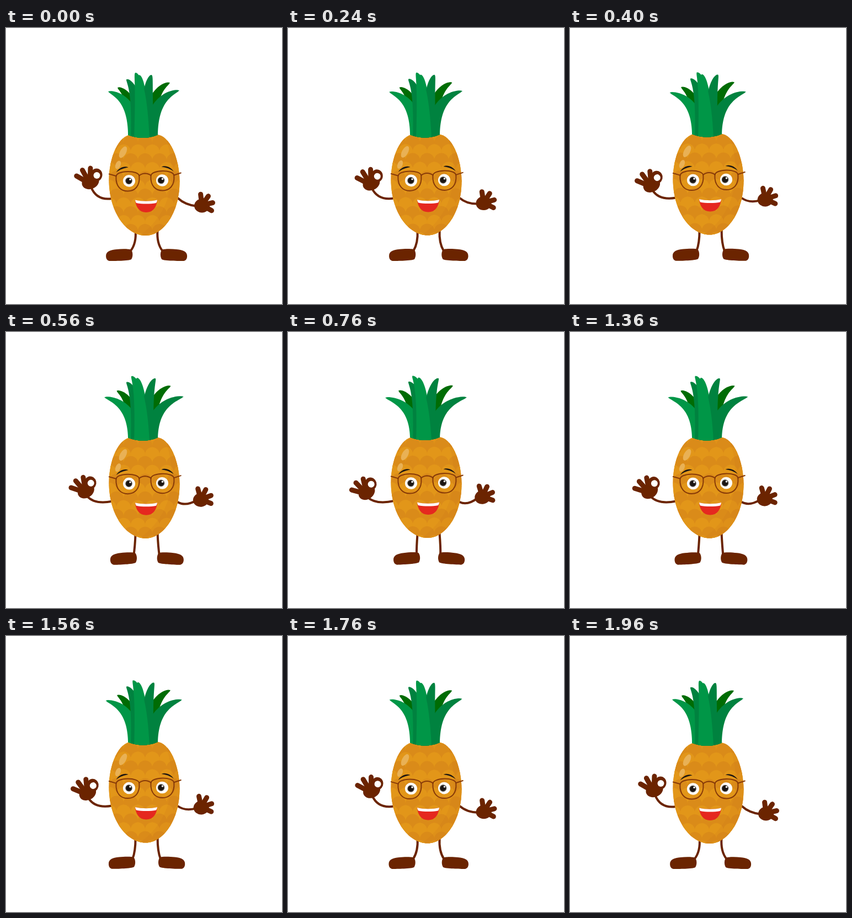
An HTML page with a canvas for the animation above (2000 ms loop, 500 by 500 pixels).

```html
<!DOCTYPE html>
<html lang="en">
<head>
<meta charset="utf-8">
<title>Pineapple</title>
<style>
html, body { margin: 0; width: 100%; height: 100%; overflow: hidden; background: #fff; }
canvas { display: block; }
</style>
</head>
<body>
<canvas id="stage" width="500" height="500"></canvas>
<script>
const ctx = document.getElementById('stage').getContext('2d');
const LOOP = 2000, STEP = 40, MOVE = 820, END = 1960;
const BROWN = '#6b2400', FRAME = '#873a08', INK = '#1b1512';
const GREEN = '#009647', SHADE = '#00823f', DEEP = '#006c04';

const mix = (a, b, p) => a + (b - a) * p;

// Eases out, rests at the far pose, then eases back.
function pose(t) {
  const u = Math.max(0, Math.min(1, Math.min(t, END - t) / MOVE));
  return (1 - Math.cos(Math.PI * u)) / 2;
}

function fill(d, color) {
  ctx.fillStyle = color;
  ctx.fill(new Path2D(d));
}

function stroke(d, color, width) {
  ctx.strokeStyle = color;
  ctx.lineWidth = width;
  ctx.stroke(new Path2D(d));
}

function oval(x, y, rx, ry, color, angle = 0) {
  ctx.fillStyle = color;
  ctx.beginPath();
  ctx.ellipse(x, y, rx, ry, angle, 0, Math.PI * 2);
  ctx.fill();
}

function placed(x, y, degrees, draw) {
  ctx.save();
  ctx.translate(x, y);
  ctx.rotate(degrees * Math.PI / 180);
  draw();
  ctx.restore();
}

// Draws a left half around the axis x, then its mirror image.
function mirrored(x, draw) {
  for (const side of [1, -1]) {
    ctx.save();
    ctx.translate(x, 0);
    ctx.scale(side, 1);
    draw(side);
    ctx.restore();
  }
}

function limb(x, y, cx, cy, endX, endY) {
  stroke(`M${x} ${y}Q${cx} ${cy} ${endX} ${endY}`, BROWN, 4);
}

function fan(count, first, gap, length) {
  for (let i = 0; i < count; i++) {
    const a = (first + gap * i) * Math.PI / 180;
    stroke(`M0 0L${length * Math.cos(a)} ${length * Math.sin(a)}`, BROWN, 9);
  }
}

function okHand() {
  fan(3, -150, 31, 28);
  oval(1, -3, 16, 12.5, BROWN, -0.4);
  oval(12, -16, 10.5, 11.5, BROWN);
  oval(12.5, -15, 6, 6, '#fff');
}

function openHand() {
  fan(4, -97, 42, 20);
  oval(0, 1, 14, 12.5, BROWN);
}

function shoe() {
  fill('M-24 2C-24-6-17-9-5-10C5-11 18-11 22-9C25-4 25 3 22 8C18 11-10 11-18 11C-22 10-24 7-24 2Z', BROWN);
}

function limbs(p) {
  mirrored(254.6, side => {
    limb(-20, 366, mix(-18, -22, p), 390, mix(-29, -21.5, p), 404);
    placed(mix(-49.5, side > 0 ? -39.5 : -41.5, p), mix(411, 410, p), -2 * p, shoe);
  });
  const handX = mix(152, 142.3, p), handY = mix(282, 293.6, p);
  limb(192, mix(309, 306, p), mix(164, 159, p), 313, handX + 2, handY + 6);
  placed(handX, handY, -15 * p, okHand);
  const palmX = mix(355, 352, p), palmY = mix(321, 298, p);
  limb(311, 308, 325, mix(321, 315, p), palmX - 8, palmY + 2);
  placed(palmX, palmY, -10 * p, openHand);
}

const BODY = 'M186.5 275C186.5 235 204 193 228 193L272 193C297 193 314.5 238 314.5 278C314.5 336 284 376 253 376C218 376 186.5 334 186.5 275Z';

function body() {
  ctx.save();
  fill(BODY, '#e09318');
  ctx.clip(new Path2D(BODY));
  for (let row = 0; row < 12; row++) {
    const odd = row % 2;
    for (let x = 174 + odd * 13; x < 330; x += 26) {
      oval(x, 208 + row * 16, 13, 13, odd ? '#e29619' : '#da8b19');
    }
  }
  fill('M286 190C315 265 300 340 236 380L330 380L330 190Z', 'rgba(200,112,25,.16)');
  ctx.restore();
  oval(212, 225, 5.5, 11.5, '#e9b155', 0.5);
  oval(203, 248, 4.5, 8, '#e9b155', 0.4);
}

// A tapered blade that rises from the base and bends over to its tip.
function leaf(color, tipX, tipY, baseX, spread) {
  const baseY = 202, lean = tipX - 248;
  const x = tipX + Math.sign(lean) * spread;
  const y = tipY + spread * Math.abs(lean) / 80;
  const bendX = mix(baseX, x, 0.05), bendY = mix(baseY, y, 0.86);
  const left = [], right = [];
  for (let s = 0; s <= 1; s += 1 / 32) {
    const px = mix(mix(baseX, bendX, s), mix(bendX, x, s), s);
    const py = mix(mix(baseY, bendY, s), mix(bendY, y, s), s);
    const vx = mix(bendX - baseX, x - bendX, s), vy = mix(bendY - baseY, y - bendY, s);
    const half = 14 * (1 - s) ** 0.6 / Math.hypot(vx, vy);
    left.push(`${px + vy * half} ${py - vx * half}`);
    right.unshift(`${px - vy * half} ${py + vx * half}`);
  }
  fill('M' + left.concat(right).join('L') + 'Z', color);
}

function crown(p) {
  ctx.save();
  ctx.clip(new Path2D('M150 60H350V194H275Q248 204 221 194H150Z'));
  leaf(DEEP, 297, 99, 257, 2 * p);
  leaf(DEEP, 202, 108, 235, 2 * p);
  leaf(GREEN, 241, 85, 246, 5 * p);
  leaf(SHADE, 314, 113, 261, 10 * p);
  leaf(GREEN, 185, 115, 235, 9 * p);
  leaf(SHADE, 218, 93, 240, 0);
  leaf(SHADE, 264, 85, 254, 9 * p);
  leaf(GREEN, 234, 81, 246, 9 * p);
  ctx.restore();
}

function eye(x, pupil) {
  oval(x, 0, 11, 10.8, '#fff');
  oval(pupil, 0, 6.3, 6.3, '#555049');
  oval(pupil, 0, 5, 5, INK);
  oval(pupil + 2.5, -2.5, 1.7, 1.7, '#fff');
}

function face() {
  placed(252, 276.5, -0.9, () => {
    eye(-29, -29.5);
    eye(31, 29);
    mirrored(0, () => {
      stroke('M-52.5-8C-52.5-20-10.5-20-10.5-8C-9.5 10-19 18.5-31.5 18.5C-44 18.5-53.5 10-52.5-8Z', FRAME, 2);
      stroke('M-11-9Q-6-13 0-13M-65-13L-52-9', FRAME, 2);
      fill('M-52-16C-47-24-37-28-30-24.5C-38-23.5-45-21-52-16Z', INK);
    });
  });
  fill('M234 311.5C246 314.5 262 314.5 274 311.5C273 325 266 334 254 334C242 334 235 325 234 311.5Z', '#e5281f');
  fill('M234 311.5C246 314.5 262 314.5 274 311.5Q273.5 315 272 317C262 319 246 319 236 317Q234.5 315 234 311.5Z', '#fff');
}

function draw(now) {
  const p = pose(Math.floor((now % LOOP) / STEP) * STEP);
  ctx.fillStyle = '#fff';
  ctx.fillRect(0, 0, 500, 500);
  limbs(p);
  placed(0, -3 * p, 0, () => {
    body();
    crown(p);
    face();
  });
}

ctx.lineCap = 'round';
ctx.lineJoin = 'round';
const start = performance.now();
function tick() {
  draw(performance.now() - start);
  requestAnimationFrame(tick);
}
tick();
</script>
</body>
</html>
```
